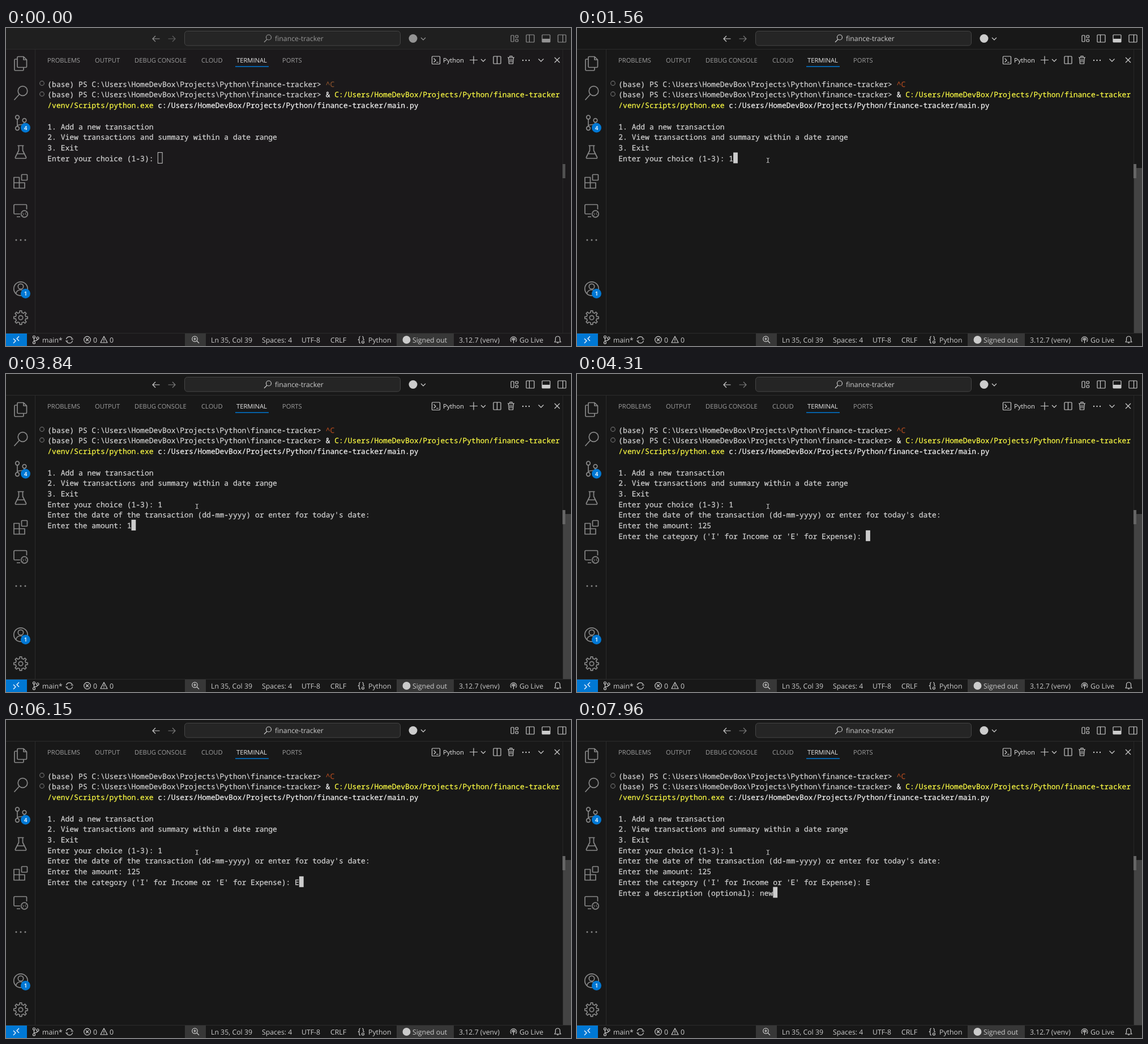
An HTML page that plays this animation: 998x561 px, repeating every 8000 ms.

```html
<!DOCTYPE html>
<html lang="en">
<head>
<meta charset="utf-8">
<title>Terminal session</title>
<style>
  html, body { margin: 0; width: 100%; height: 100%; overflow: hidden; background: #181818; }
  svg { display: block; width: 998px; height: 561px; }
  text { white-space: pre; color: #ccc; fill: currentColor; text-rendering: geometricPrecision; }
  .ui text { font: 12.3px "Open Sans", "Noto Sans", sans-serif; }
  .ui .tabs text { font-size: 11.2px; color: #9d9d9d; }
  .ui .tabs .on { color: #e7e7e7; }
  .ui .badge { font-size: 10px; font-weight: 600; color: #fff; text-anchor: middle; }
  .term text { font: 13px "Noto Sans Mono", "DejaVu Sans Mono", monospace; color: #d0d0d0; }
  .term tspan { fill: currentColor; stroke: currentColor; stroke-width: .25; }
  .icon { fill: none; stroke: #ccc; stroke-width: 1.2; stroke-linejoin: round; }
  .side { stroke: #888; stroke-width: 1.7; }
  .dot { fill: #ccc; stroke: none; }
  .side .dot { fill: #888; }
  .yellow { color: #f9f943; }
  .white { color: #f2f2f2; }
  .rust { color: #a8481f; }
  .back { fill: #181818; }
  .mark { fill: #656565; }
  .blurred .back { fill: #1b191b; }
  .blurred .bar { fill: #1f1f1f; }
  .blurred .mark { fill: #505050; }
  .blurred .rust { color: #84502c; }
  .blurred .title { opacity: .68; }
</style>
</head>
<body>
<svg id="stage" viewBox="0 0 998 561">
  <rect class="back" width="998" height="561"/>
  <rect class="back bar" width="998" height="37"/>
  <path d="M0 37.500H998M51.500 38V538M0 538.500H998" stroke="#2b2b2b"/>

  <g class="ui">
    <rect x="315.500" y="5.500" width="381" height="25.500" rx="5" fill="#252525" stroke="#454545"/>
    <g class="title">
      <text x="475" y="23">finance-tracker</text>
      <g class="icon">
        <path d="M271.500 19H259M264 14L259 19L264 24"/>
        <path d="M286.500 19H299M294 14L299 19L294 24" opacity=".55"/>
        <circle cx="464" cy="16.500" r="4.500"/><path d="M461 20L456 25"/>
        <circle class="dot" cx="719" cy="18.500" r="7.500"/>
        <path d="M733 17L737 21L741 17"/>
        <rect x="892" y="13" width="5" height="11" rx="1"/><rect x="900" y="13" width="4.500" height="4" rx="1"/><rect x="900" y="20" width="4.500" height="4" rx="1"/>
        <rect x="919" y="12" width="14" height="13" rx="1"/><path d="M924.500 12V25"/>
        <rect x="947" y="12" width="14" height="13" rx="1"/><path class="dot" d="M947 19H961V25H947Z"/>
        <rect x="975" y="12" width="14" height="13" rx="1"/><path d="M983.500 12V25"/>
      </g>
    </g>

    <g class="tabs">
      <text x="73" y="61">PROBLEMS</text>
      <text x="157" y="61">OUTPUT</text>
      <text x="227" y="61">DEBUG CONSOLE</text>
      <text x="345" y="61">CLOUD</text>
      <text x="407" y="61" class="on">TERMINAL</text>
      <text x="488" y="61">PORTS</text>
      <text x="772" y="61" class="on">Python</text>
      <path d="M405 68H464" stroke="#0078d4" stroke-width="1.500"/>
    </g>
    <g class="icon">
      <rect x="752.500" y="50" width="14" height="13.500" rx="1"/><path d="M755.500 53.500L759 57L755.500 60.500M760 60.500H764"/>
      <path d="M819 56.500H833M826 49.500V63.500M839 55L843 59L847 55"/>
      <rect x="861" y="50" width="13" height="13" rx="1"/><path d="M867.500 50V63"/>
      <path d="M886 52H898M890 52V49.500H894V52M887.500 52L888.500 63H895.500L896.500 52M890.500 54.500V60.500M893.500 54.500V60.500"/>
      <path d="M940.500 54.500L945 59L949.500 54.500M969 52L978 61M978 52L969 61"/>
      <g class="dot"><circle cx="913" cy="57" r="1.200"/><circle cx="918.500" cy="57" r="1.200"/><circle cx="924" cy="57" r="1.200"/></g>
    </g>

    <g class="icon side">
      <path d="M20 55V52Q20 50.500 21.500 50.500H31L36.500 56V68Q36.500 69.500 35 69.500H21.500Q20 69.500 20 68V55H16.500Q15 55 15 56.500V73.500Q15 75 16.500 75H29.500Q31 75 31 73.500V69.500M31 50.500V56H36.500"/>
      <circle cx="29.500" cy="111" r="8.300"/><path d="M23.500 117L14.500 127"/>
      <circle cx="20" cy="157.500" r="3.300"/><circle cx="32.500" cy="163" r="3.300"/><circle cx="20" cy="177" r="3.300"/><path d="M20 161V173.500M32.500 166.500Q32 170.500 27 170.500Q20 170.500 20 173.500"/>
      <path d="M20.500 207.500H31.500M22.500 207.500V216L16.500 228Q16 230 18 230H34Q36 230 35.500 228L29.500 216V207.500M19.500 222H32.500"/>
      <path d="M14 263.500H23.500V273H33V282.500H14ZM14 273H23.500V282.500"/><rect x="27.500" y="258.500" width="10" height="10" rx="1"/>
      <path d="M25 328H15.500Q14 328 14 326.500V313Q14 311.500 15.500 311.500H35Q36.500 311.500 36.500 313V320M19 333H25"/>
      <circle cx="32.500" cy="328" r="5.800"/><path stroke-width="1" d="M29 326L31.500 328.500L29 331M36 325L33.500 327.500L36 330"/>
      <g class="dot"><circle cx="18" cy="374" r="1.500"/><circle cx="26" cy="374" r="1.500"/><circle cx="34" cy="374" r="1.500"/></g>
      <circle cx="26" cy="460" r="12.200"/><circle cx="26" cy="456" r="4.700"/><path d="M17.500 468.500Q19 462 26 462Q33 462 34.500 468.500"/>
      <path id="gear"/><circle cx="26" cy="511" r="3.700"/>
    </g>
    <g fill="#0078d4"><circle cx="34.500" cy="176" r="8.500"/><circle cx="34.500" cy="468.500" r="8.500"/><rect y="539" width="37" height="22"/></g>
    <text class="badge" x="34.500" y="179.700">4</text>
    <text class="badge" x="34.500" y="472.200">1</text>

    <g fill="#373737"><rect x="316" y="539" width="37" height="22"/><rect x="690" y="539" width="101" height="22"/></g>
    <g id="status"></g>
    <g class="icon">
      <path stroke="#fff" d="M13 548L17 552L13 556M23 544L19 548L23 552"/>
      <circle cx="49.500" cy="545" r="2"/><circle cx="49.500" cy="555" r="2"/><circle cx="56" cy="547" r="2"/><path d="M49.500 547V553M56 549Q56 551.500 49.500 552"/>
      <path d="M106.500 549A5.500 5.500 0 0 1 117 548M117.500 551.500A5.500 5.500 0 0 1 107 552.500M114.500 549H119M105 552H109.500"/>
      <circle cx="143.500" cy="550" r="5.800"/><path d="M141 547.500L146 552.500M146 547.500L141 552.500"/>
      <path d="M173 544L179 555H167ZM173 548V552M173 553V554"/>
      <circle cx="333.500" cy="548.500" r="4.700"/><path d="M337 552L341 556M331 548.500H336M333.500 546V551"/>
      <path d="M626 544Q624 544 624 546V548Q624 550 622 550Q624 550 624 552V554Q624 556 626 556M629 544Q631 544 631 546V548Q631 550 633 550"/><circle cx="630.500" cy="554" r="2"/>
      <circle class="dot" cx="707.500" cy="550" r="7"/>
      <path d="M892.500 553.500A5.300 5.300 0 1 1 900.500 553.500M894 551A2.800 2.800 0 1 1 899 551M896.500 550V556"/><circle cx="896.500" cy="549.500" r="1"/>
      <path d="M969 554H980L978.500 551.500V548Q978.500 544 974.500 544Q970.500 544 970.500 548V551.500ZM973 555.500H976"/>
    </g>
  </g>

  <g fill="none" stroke="#707070" stroke-width="1.200"><circle cx="63.500" cy="97.500" r="3.800"/><circle cx="63.500" cy="116.500" r="3.800"/></g>
  <path d="M983.500 38V538" stroke="#262626"/>
  <rect id="slider" x="984" y="247" width="14" height="291" fill="#434343"/>
  <rect class="mark" x="983" y="240" width="5" height="25"/>

  <g class="term" id="term"></g>
  <rect id="cursor" width="7.800" height="19" stroke="#ccc"/>
  <path id="pointer" d="M335 229.500Q337.300 229.500 337.300 231V236Q337.300 237.500 335 237.500M339.500 229.500Q337.300 229.500 337.300 231M337.300 236Q337.300 237.500 339.500 237.500" fill="none" stroke="#ddd"/>
</svg>
<script>
const LOOP = 8000, LEFT = 73.3, ADVANCE = 7.8, POINTER_AT = 130, FOCUS_AT = 300;
const $ = id => document.getElementById(id);
const rowY = row => 99 + 18.73 * row;

function addText(parent, x, y, parts) {
  const ns = 'http://www.w3.org/2000/svg';
  const text = document.createElementNS(ns, 'text');
  text.setAttribute('x', x);
  text.setAttribute('y', y);
  const spans = parts.map(([content, color]) => {
    const span = document.createElementNS(ns, 'tspan');
    span.textContent = content;
    if (color) span.setAttribute('class', color);
    return span;
  });
  text.append(...spans);
  parent.append(text);
  return spans[0];
}
const addRow = (row, ...parts) => addText($('term'), LEFT, rowY(row) + 4.6, parts);

function gearPath(cx, cy, teeth, outer, inner) {
  const points = [];
  const step = 2 * Math.PI / teeth;
  for (let i = 0; i < teeth; i++) {
    for (const [radius, offset] of [[inner, -.27], [outer, -.18], [outer, .18], [inner, .27]]) {
      const angle = (i + offset) * step;
      points.push(`${cx + radius * Math.cos(angle)} ${cy + radius * Math.sin(angle)}`);
    }
  }
  return `M${points.join('L')}Z`;
}
$('gear').setAttribute('d', gearPath(26, 511, 8, 12.3, 9.2));

const status = [
  [64, 'main*'], [154, '0'], [183, '0'], [362, 'Ln 35, Col 39'], [452, 'Spaces: 4'],
  [522, 'UTF-8'], [573, 'CRLF'], [640, 'Python'], [718, 'Signed out'],
  [800, '3.12.7 (venv)'], [907, 'Go Live'],
];
for (const [x, label] of status) addText($('status'), x, 554.5, [[label]]);

const folder = '/Users/HomeDevBox/Projects/Python/finance-tracker';
const shell = `(base) PS C:${folder.replaceAll('/', '\\')}> `;
addRow(0, [shell], ['^C', 'rust']);
addRow(1, [shell], ['& ', 'white'], ['C:' + folder, 'yellow']);
addRow(2, ['/venv/Scripts/python.exe', 'yellow'], [` c:${folder}/main.py`, 'white']);
addRow(4, ['1. Add a new transaction']);
addRow(5, ['2. View transactions and summary within a date range']);
addRow(6, ['3. Exit']);

// Each prompt: time shown, label, answer, time of each keystroke
const prompts = [
  [0, 'Enter your choice (1-3): ', '1', [1560]],
  [1690, "Enter the date of the transaction (dd-mm-yyyy) or enter for today's date: ", '', []],
  [3000, 'Enter the amount: ', '125', [3840, 3960, 4090]],
  [4310, "Enter the category ('I' for Income or 'E' for Expense): ", 'E', [6080]],
  [6600, 'Enter a description (optional): ', 'new', [7640, 7770, 7900]],
].map(([at, label, answer, keys], i) =>
  ({ at, label, answer, keys, row: 7 + i, node: addRow(7 + i, ['']) }));

function render(t) {
  const focused = t >= FOCUS_AT;
  $('stage').classList.toggle('blurred', !focused);
  for (const id of ['slider', 'pointer']) {
    $(id).style.visibility = t >= POINTER_AT ? 'visible' : 'hidden';
  }
  for (const { at, label, answer, keys, row, node } of prompts) {
    const shown = t >= at;
    const line = shown ? label + answer.slice(0, keys.filter(k => t >= k).length) : '';
    if (node.textContent !== line) node.textContent = line;
    if (!shown) continue;
    const cursor = $('cursor');
    cursor.setAttribute('x', LEFT + line.length * ADVANCE);
    cursor.setAttribute('y', rowY(row) - 10.5);
    cursor.setAttribute('fill', focused ? '#ccc' : 'none');
    cursor.setAttribute('stroke-width', focused ? 0 : 1);
  }
}

const start = performance.now();
function tick() {
  render((performance.now() - start) % LOOP);
  requestAnimationFrame(tick);
}
tick();
</script>
</body>
</html>
```
